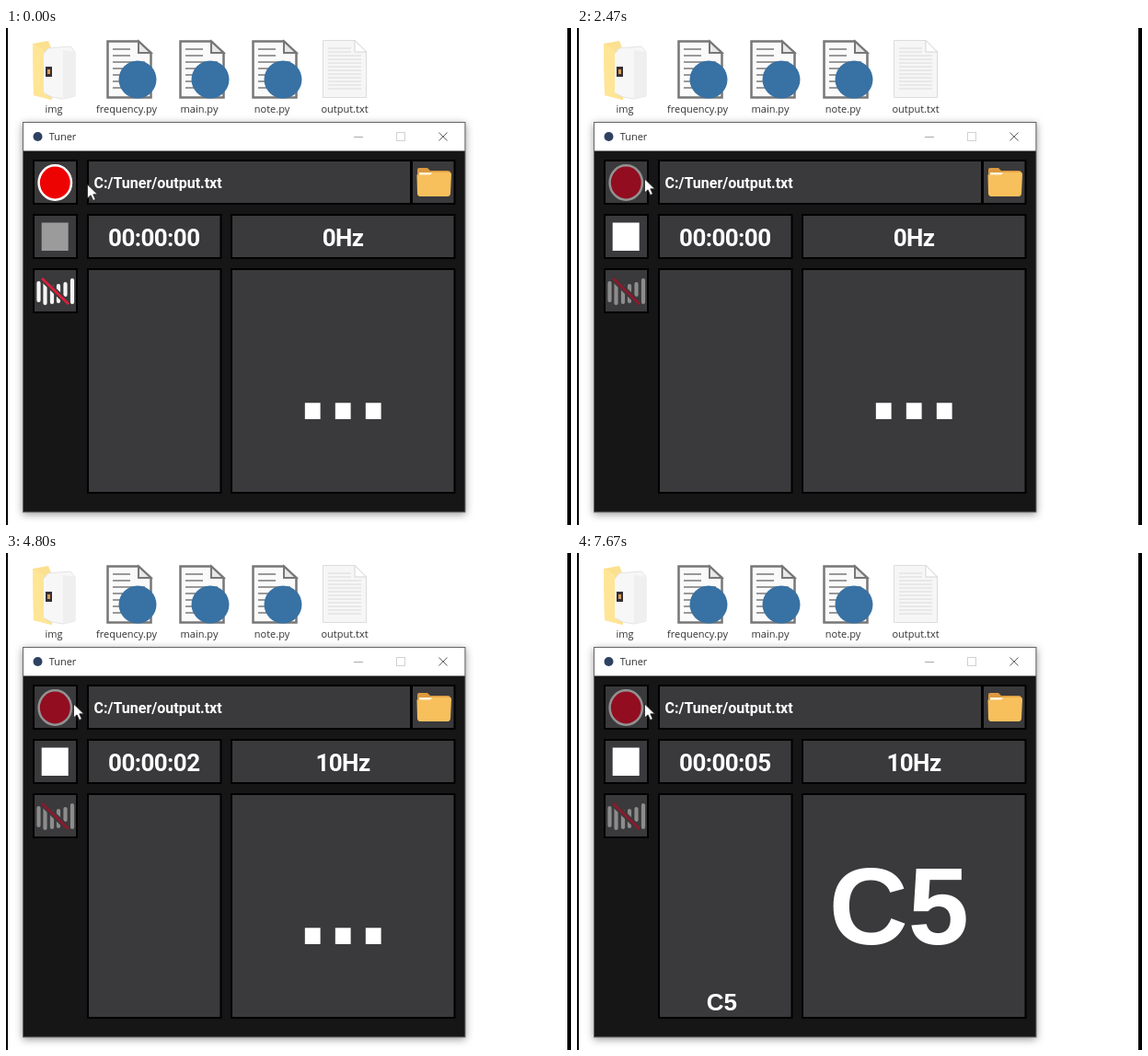
These frames come from a looping animation (614x540 px, 8000 ms). An HTML page:

```html
<!DOCTYPE html>
<html lang="en">
<head>
<meta charset="utf-8">
<title>Tuner</title>
<style>
  html, body { margin: 0; width: 100%; height: 100%; overflow: hidden; background: #fff; }
  svg { display: block; }
  text { white-space: pre; }
  .label { font: 11px "Open Sans", sans-serif; fill: #333; text-anchor: middle; }
  .din { font: bold 26px Roboto, sans-serif; letter-spacing: -.6px; fill: #fff; text-anchor: middle; }
  .note { font: bold 119px "Liberation Sans", Arial, sans-serif; fill: #fff; text-anchor: middle; }
  #panels rect { fill: #3a393b; stroke: #000; stroke-width: 2; }
  #record { fill: #ee0303; stroke: #fff; }
  #stop { fill: #9b9b9b; }
  #bars { stroke: #f4f4f4; }
  #slash { stroke: #d5203a; }
  .recording #record { fill: #920d20; stroke: #929292; }
  .recording #stop { fill: #fff; }
  .recording #bars { stroke: #8c8c8c; }
  .recording #slash { stroke: #8a1a2c; }
</style>
</head>
<body>
<svg id="stage" width="614" height="540" viewBox="0 0 614 540">
  <defs>
    <filter id="shadow" x="-10%" y="-10%" width="120%" height="120%">
      <feDropShadow dx="0" dy="2" stdDeviation="4" flood-opacity=".4"/>
    </filter>
    <g id="script">
      <path d="M1.5 1.5H35L48.5 14V62.5H1.5Z" fill="#fafafa" stroke="#777" stroke-width="2.5"/>
      <path d="M35 1.5V14H48.5Z" fill="#e8e8e8" stroke="#777" stroke-width="2"/>
      <path d="M7 10H26M7 17H26M7 24H42M7 31H42M7 38H42M7 45H42M7 52H42" stroke="#999" stroke-width="1.8"/>
      <circle cx="34" cy="43" r="20.5" fill="#3871a3"/>
    </g>
  </defs>

  <rect width="614" height="540" fill="#fff"/>
  <path d="M0 0H2V540H0ZM610 0H614V540H610Z"/>

  <!-- Desktop files -->
  <path d="M29 17L46 14L50 24V78L30 73Z" fill="#fbe08f"/>
  <path d="M40 29L46 22L70 20L75 26V74L62 77L50 75L40 70Z" fill="#f7f7f7" stroke="#e4e4e4"/>
  <path d="M62 24L75 26V74L62 77Z" fill="#efefef"/>
  <path d="M29 17L41 24V70L49 78L30 73Z" fill="#ffe596"/>
  <rect x="43" y="42" width="7" height="11" fill="#353035"/>
  <rect x="45" y="45" width="3" height="5" fill="#d79a52"/>
  <use href="#script" x="109" y="13"/>
  <use href="#script" x="188" y="13"/>
  <use href="#script" x="267" y="13"/>
  <path d="M344.5 13.5H379L391.5 26V75.5H344.5Z" fill="#f6f6f6" stroke="#dcdcdc"/>
  <path d="M379 13.5V26H391.5Z" fill="#fff" stroke="#d5d5d5"/>
  <path d="M350 22H375M350 26H375M350 30H386M350 34H386M350 38H386M350 42H386M350 46H386M350 50H386M350 54H386M350 58H386M350 62H386M350 66H386" stroke="#dadada"/>
  <g class="label">
    <text x="52" y="92">img</text>
    <text x="131" y="92">frequency.py</text>
    <text x="210" y="92">main.py</text>
    <text x="289" y="92">note.py</text>
    <text x="368" y="92">output.txt</text>
  </g>

  <!-- Window -->
  <rect x="18.5" y="102.5" width="480.5" height="423.5" fill="#181618" stroke="#666" filter="url(#shadow)"/>
  <rect x="19" y="103" width="479.5" height="30.5" fill="#fff"/>
  <circle cx="34.5" cy="118" r="5" fill="#2f4160"/>
  <text class="label" x="61.5" y="122">Tuner</text>
  <g fill="none">
    <path d="M378 118.5H388" stroke="#aaa"/>
    <rect x="424.5" y="113.5" width="9" height="9" stroke="#d2d2d2"/>
    <path d="M470.5 113.5L479.5 122.5M479.5 113.5L470.5 122.5" stroke="#666"/>
  </g>
  <g id="panels"></g>

  <ellipse id="record" cx="53.3" cy="168" rx="17.7" ry="18.7" stroke-width="2.5"/>
  <rect id="stop" x="38.7" y="211.5" width="29" height="30.5"/>
  <path id="bars" d="M35.5 277V296M42.5 275V299M50 281V298M57 280V297M64.5 278V290M72 274V298" stroke-width="4.2" stroke-linecap="round"/>
  <path d="M39 272L68 300" stroke="#3a393b" stroke-width="6"/>
  <path id="slash" d="M39 272L68 300" stroke-width="3"/>

  <path d="M447 154Q447 152 449 152H458L461 155H480Q483 155 483 158V179H447Z" fill="#dc993f"/>
  <path d="M449 157H472V165H449Z" fill="#fff4dc"/>
  <path d="M446.5 159.5H461L464 156.5H482Q484 156.5 484 159L483 180Q482.5 183 480 183H450Q447.5 183 447 180Z" fill="#f7c05c"/>

  <text x="95.5" y="174" style="font: bold 16px Roboto, sans-serif" fill="#fff">C:/Tuner/output.txt</text>
  <text id="timer" class="din" x="160.8" y="236.8"></text>
  <text id="pitch" class="din" x="366" y="236.8"></text>
  <text id="history" class="note" x="161" y="497.3" style="font-size: 26px"></text>
  <text id="note" class="note" x="366.3" y="425.3"></text>

  <path id="cursor" d="M0 0V15L3.6 11.8L6.2 17.5L8.8 16.3L6.3 10.8H11Z" fill="#fff" stroke="#222" stroke-width=".8"/>
</svg>
<script>
  const LOOP = 8000;
  const RECORD_AT = 1930;
  const SECOND_TICKS = [2800, 4130, 5070, 5930, 6730];
  const PITCH_AT = SECOND_TICKS[0];
  const NOTE_AT = SECOND_TICKS[4];
  const PANELS = [
    [30, 144, 47, 47], [89, 144, 351, 47], [441, 144, 46.5, 47],
    [30, 203, 47, 47], [89, 203, 144.5, 47], [245, 203, 242.5, 47],
    [30, 262, 47, 47], [89, 262, 144.5, 243], [245, 262, 242.5, 243]
  ];

  const byId = id => document.getElementById(id);
  const setText = (id, value) => {
    const node = byId(id);
    if (node.textContent !== value) node.textContent = value;
  };

  byId("panels").innerHTML = PANELS.map(([x, y, w, h]) =>
    `<rect x="${x}" y="${y}" width="${w}" height="${h}"/>`).join("");

  function draw(t) {
    const p = Math.min(1, Math.max(0, (t - 70) / 660));
    const eased = p * p * (3 - 2 * p);
    byId("cursor").setAttribute("transform", `translate(${88.5 - 15 * eased} ${170 - 6 * eased})`);

    byId("stage").classList.toggle("recording", t >= RECORD_AT);
    setText("timer", "00:00:0" + SECOND_TICKS.filter(tick => t >= tick).length);
    setText("pitch", t >= PITCH_AT ? "10Hz" : "0Hz");
    // The trailing space keeps the note left of centre.
    const heard = t >= NOTE_AT;
    setText("note", heard ? "C5 " : "...");
    setText("history", heard ? "C5 " : "");
  }

  const start = performance.now();
  function frame() {
    draw((performance.now() - start) % LOOP);
    requestAnimationFrame(frame);
  }
  frame();
</script>
</body>
</html>
```
